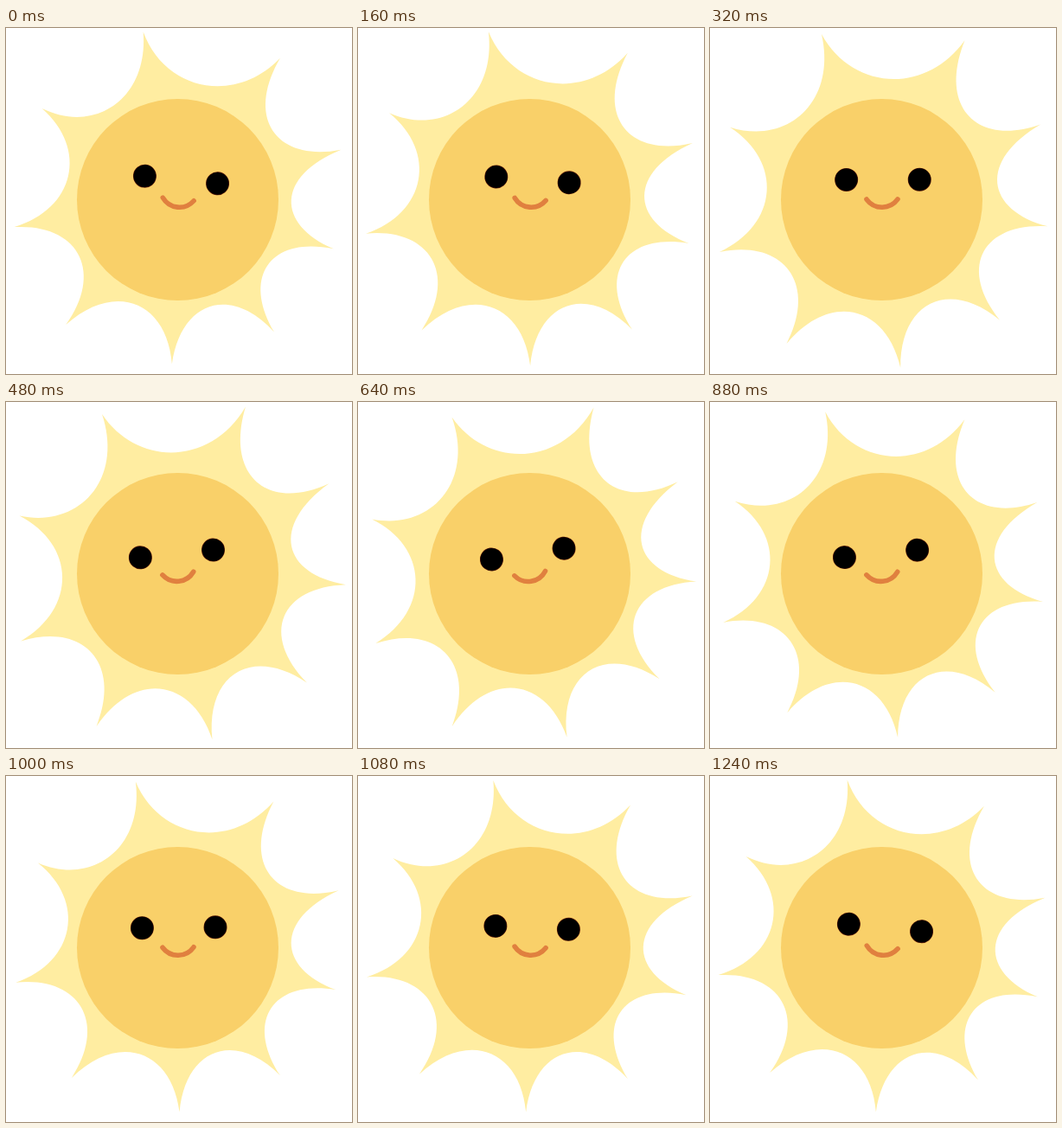
These frames come from a looping animation (400x400 px, 1280 ms). An HTML page with a canvas:

```html
<!DOCTYPE html>
<html lang="en">
<head>
<meta charset="utf-8">
<title>Smiling sun</title>
<style>
  html, body { margin: 0; width: 100%; height: 100%; overflow: hidden; background: #fff; }
  canvas { display: block; width: 100vw; height: 100vh; }
</style>
</head>
<body>
<canvas id="stage" width="400" height="400"></canvas>
<script>
const ctx = document.getElementById("stage").getContext("2d");
const LOOP = 1280;
const STEP = 40;
const CENTER = 198.5;
const VALLEY_DEPTH = 0.68;   // valley radius relative to its neighbouring rays
const VALLEY_WIDTH = 0.8;    // how far the curve handles spread towards the tips

// Ray tips around the sun: angle in degrees and length.
const RAYS = [
  [-101.6, 198], [-54.1, 202], [-17, 197.5],
  [17.5, 189], [53.9, 189.5], [92, 190],
  [131.8, 194], [170.5, 191.5], [213.9, 189]
];

const radians = degrees => degrees * Math.PI / 180;

function polar(degrees, radius) {
  const a = radians(degrees);
  return [CENTER + radius * Math.cos(a), CENTER + radius * Math.sin(a)];
}

function buildRays() {
  const path = new Path2D();
  path.moveTo(...polar(...RAYS[0]));
  RAYS.forEach(([angle, length], i) => {
    const [nextAngle, nextLength] = RAYS[(i + 1) % RAYS.length];
    const half = ((nextAngle - angle + 360) % 360) / 2;
    const middle = angle + half;
    const spread = half * VALLEY_WIDTH;
    const mean = (length + nextLength) / 2;
    // Handle radius that puts the middle of the curve at the valley radius.
    const handle = mean * (VALLEY_DEPTH - Math.cos(radians(half)) / 4) /
      (0.75 * Math.cos(radians(spread)));
    path.bezierCurveTo(
      ...polar(middle - spread, handle),
      ...polar(middle + spread, handle),
      ...polar(nextAngle, nextLength)
    );
  });
  path.closePath();
  return path;
}

const raysPath = buildRays();

function easeInOut(t, start, end) {
  const p = Math.min(1, Math.max(0, (t - start) / (end - start)));
  const a = p ** 1.75;
  return a / (a + (1 - p) ** 1.75);
}

// Rises from 0 to 1, then falls back to 0.
function swing(t, riseStart, riseEnd, fallStart, fallEnd) {
  return easeInOut(t, riseStart, riseEnd) - easeInOut(t, fallStart, fallEnd);
}

function disc(x, y, radius, color) {
  ctx.fillStyle = color;
  ctx.beginPath();
  ctx.arc(x, y, radius, 0, Math.PI * 2);
  ctx.fill();
}

function eye(x) {
  disc(x, 175.3, 13.5, "#5a1a08");
  disc(x, 175.3, 12.9, "#000");
}

function turn(x, y, degrees, scale = 1) {
  ctx.translate(x, y);
  ctx.rotate(radians(degrees));
  ctx.scale(scale, scale);
  ctx.translate(-x, -y);
}

function drawRays(t) {
  const angle = -15 * swing(t, 0, 600, 600, 1165);
  const scale = 1 + 0.032 * swing(t, 0, 410, 410, 960);
  ctx.save();
  turn(CENTER, CENTER, angle, scale);
  ctx.fillStyle = "#ffeda1";
  ctx.fill(raysPath);
  ctx.restore();
}

function drawFace(t) {
  disc(CENTER, CENTER, 116.5, "#f9d069");
  ctx.save();
  turn(199.8, 200, 5.8 - 14.6 * swing(t, 30, 680, 700, 1262));
  eye(157.7);
  eye(242.3);
  ctx.strokeStyle = "#e0803f";
  ctx.lineWidth = 5.6;
  ctx.lineCap = "round";
  ctx.beginPath();
  ctx.moveTo(181, 198);
  ctx.bezierCurveTo(190, 210.3, 208, 210.3, 217, 198);
  ctx.stroke();
  ctx.restore();
}

function draw(now) {
  const t = Math.floor((now % LOOP) / STEP) * STEP;
  ctx.fillStyle = "#fff";
  ctx.fillRect(0, 0, 400, 400);
  drawRays(t);
  drawFace(t);
}

function tick() {
  draw(performance.now());
  requestAnimationFrame(tick);
}
tick();
</script>
</body>
</html>
```
